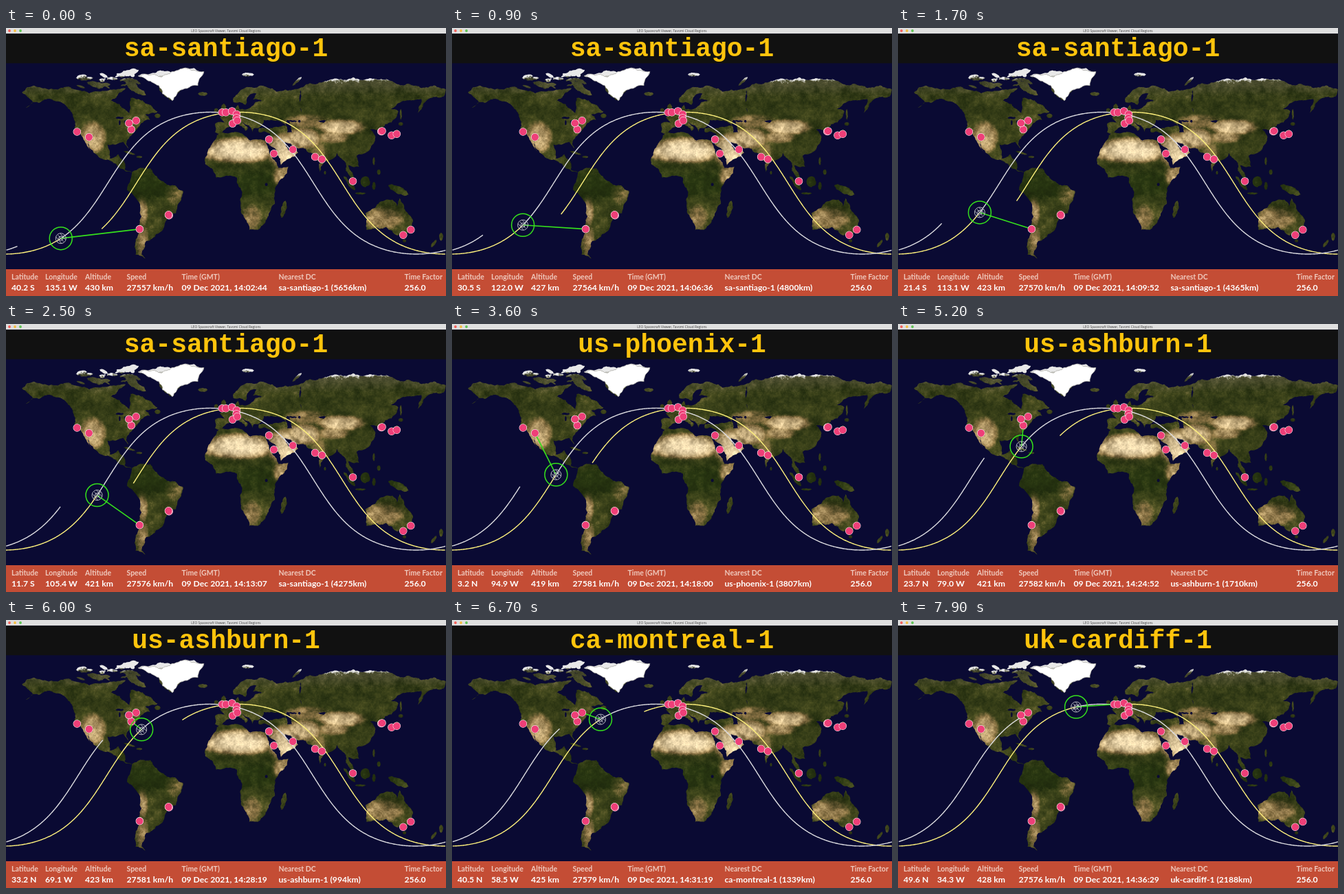
An HTML page with a canvas that plays this animation: 640x390 px, repeating every 8 s.

```html
<!DOCTYPE html>
<html lang="en">
<head>
<meta charset="utf-8">
<title>LEO Spacecraft Viewer</title>
<style>
html, body { margin: 0; width: 100%; height: 100%; overflow: hidden; background: #0a0a33; }
canvas, svg { position: absolute; left: 0; top: 0; }
svg { font-family: Lato, Carlito, sans-serif; font-weight: 700; }
#region { font: 700 38px "Liberation Mono", "Courier New", monospace; fill: #ffc40c; }
#window { font: 400 4.8px "Open Sans", sans-serif; fill: #444; }
.label { font-size: 10.5px; fill: #efc9bd; }
.value { font-size: 12.2px; fill: #fff; }
</style>
</head>
<body>
<canvas id="map" width="640" height="390"></canvas>
<svg id="ui" width="640" height="390">
  <rect width="640" height="8.3" fill="#dfdfdf"/>
  <circle cx="5" cy="4" r="1.9" fill="#f4605a"/>
  <circle cx="13" cy="4" r="1.9" fill="#f6be40"/>
  <circle cx="21" cy="4" r="1.9" fill="#5fc454"/>
  <text id="window" x="320" y="5.9" text-anchor="middle">LEO Spacecraft Viewer, Tavomi Cloud Regions</text>
  <rect y="8.3" width="640" height="43" fill="#111"/>
  <text id="region" x="320" y="40.6" text-anchor="middle"></text>
  <rect y="351" width="640" height="39" fill="#c44d35"/>
</svg>
<script>
const $ = id => document.getElementById(id);
const ctx = $('map').getContext('2d');
const X = lon => 320 + lon * 16 / 9, Y = lat => 225.7 - lat * 2;
const { sin, cos, asin, acos, atan2, round, floor, abs, exp, min, max, PI } = Math;
const RAD = PI / 180, OCEAN = '#0a0a33';
const mix = (a, b, f) => a + (b - a) * f;
const clamp = v => min(1, max(0, v));

let seed = 7;
const rnd = () => (seed = seed * 16807 % 2147483647) / 2147483647;

// Key points of the coasts, longitude and latitude; fractal edges fill in the rest
const CONTINENTS = {
  northAmerica: '-167 66 -157 71 -128 70 -95 68 -82 69 -94 60 -82 53 -79 51 -78 62 -66 58 -56 52 -66 50 -62 46 -70 43 -76 36 -81 31 -80 25 -84 30 -97 28 -95 18 -88 21 -83 15 -83 10 -77 8 -94 16 -105 20 -113 31 -110 23 -124 40 -125 48 -135 59 -150 60 -164 55 -158 59',
  southAmerica: '-77 8 -62 11 -50 0 -35 -6 -39 -15 -41 -22 -48 -26 -57 -37 -65 -42 -69 -52 -66 -55 -74 -52 -71 -30 -70 -18 -81 -5 -78 3',
  africa: '-6 36 10 37 20 31 33 31 38 18 43 11 51 12 40 -4 40 -15 35 -22 32 -29 26 -34 19 -34 12 -17 13 -8 9 0 9 4 -8 4 -17 14 -15 23',
  europe: '-9 37 -9 43 -1 44 -5 48 2 51 8 55 10 57 11 54 20 55 24 59 30 60 22 61 25 65 21 65 17 61 16 57 11 59 6 59 6 62 15 69 28 71 41 67 34 66 44 67 62 69 62 46 50 46 49 42 37 46 31 46 28 41 23 40 22 37 13 45 18 40 16 38 9 44 0 40 -5 36',
  northAsia: '60 69 72 72 104 77 140 72 180 68 178 63 163 59 157 51 160 61 143 59 135 54 141 52 132 43 100 41 60 43',
  southAsia: '132 45 127 39 128 35 122 39 118 39 122 31 116 23 107 20 109 12 100 13 104 2 98 9 97 16 91 22 80 15 77 8 72 21 57 26 48 30 51 24 57 25 59 22 45 13 35 28 36 36 27 37 27 40 41 41 49 42 50 37 54 37 52 45 62 46',
  australia: '114 -22 115 -34 131 -32 140 -38 148 -38 153 -28 145 -15 142 -11 140 -17 136 -12 131 -12 122 -18',
  greenland: '-72 78 -35 83.5 -18 81 -23 71 -40 65 -44 60 -52 65 -55 71 -66 76'
};

// lon, lat, radii, tilt
const ISLANDS = [
  [-2, 54, 2, 4], [-8, 53, 1.8, 1.6], [-19, 65, 4, 1.4], [47, -19, 2, 6.5, -15], [137, 36, 5, 1.2, 35], [143, 43, 2, 1.3],
  [143, 50, .8, 4], [121, 16, 1, 3], [125, 8, 1.5, 2], [114, 1, 4, 4], [101, 0, 7, 1.6, -48], [110, -7.4, 4.5, .7],
  [121, -2, 1.5, 3], [141, -5, 9, 2.8, -22], [146, -42, 1.5, 1.2], [176, -39, 1.6, 3], [170, -44, 1.2, 3.5, -40],
  [-79, 22, 5, .7, -15], [-71, 19, 2.5, .8], [-56, 49, 2.5, 1.6], [-74, 69, 10, 2.6, -30], [-80, 80, 9, 2.3, 15],
  [18, 79, 5, 1.4], [58, 74, 5, 1, 40], [81, 7.5, .9, 1.3]
];
const LAKES = [[-87, 47.5, 3.4, .9], [-87, 44, .8, 1.9], [-82, 44.5, 1.3, 1.3], [33, -1, 1.2, 1.2], [60, 45, 1, 1]];

// Arid regions: lon, lat, radii, strength
const DRY = [
  [10, 24, 30, 9, 1.1], [47, 24, 14, 12, 1], [63, 33, 15, 8, .85], [94, 41, 20, 6, .85], [66, 45, 20, 6, .55], [88, 34, 14, 5, .65],
  [-109, 34, 11, 12, .65], [-69, -42, 6, 13, .55], [-69, -21, 5, 11, .6], [20, -25, 9, 10, .55], [45, 6, 7, 9, .6],
  [129, -25, 18, 9, .6], [76, 21, 8, 10, .4], [-42, -9, 8, 8, .35]
];
const RAMP = [[40, 54, 17], [66, 70, 29], [136, 113, 68], [205, 180, 132], [238, 217, 174]];

// Splits an edge into a jagged coast
function rough(path, ax, ay, bx, by) {
  const dx = bx - ax, dy = by - ay;
  if (dx * dx + dy * dy < 9) return path.lineTo(bx, by);
  const k = (rnd() - .5) * .28, mx = (ax + bx) / 2 - dy * k, my = (ay + by) / 2 + dx * k;
  rough(path, ax, ay, mx, my);
  rough(path, mx, my, bx, by);
}

function shape(points) {
  const path = new Path2D(), p = points.map(([lon, lat]) => [X(lon), Y(lat)]);
  path.moveTo(...p[0]);
  p.forEach((a, i) => rough(path, ...a, ...p[(i + 1) % p.length]));
  return path;
}

function coast(text) {
  const n = text.split(' ').map(Number);
  return shape(n.filter((v, i) => i % 2 == 0).map((lon, i) => [lon, n[2 * i + 1]]));
}

function island([lon, lat, rx, ry, tilt = 0]) {
  const c = cos(tilt * RAD), s = sin(tilt * RAD);
  return shape([0, 1, 2, 3, 4, 5, 6, 7].map(i => {
    const u = rx * cos(i * PI / 4), v = ry * sin(i * PI / 4);
    return [lon + u * c - v * s, lat + u * s + v * c];
  }));
}

const hash = (x, y) => { const v = sin(x * 127.1 + y * 311.7) * 43758.5453; return v - floor(v); };
function noise(x, y) {
  const i = floor(x), j = floor(y), ease = f => f * f * (3 - 2 * f), u = ease(x - i), v = ease(y - j);
  return mix(mix(hash(i, j), hash(i + 1, j), u), mix(hash(i, j + 1), hash(i + 1, j + 1), u), v);
}
const relief = (x, y) => [24, 10, 4, 1.6].reduce((sum, size, i) => sum + noise(x / size + i * 50, y / size) * [.3, .3, .22, .18][i], 0);

// Ground colour from dryness, latitude and relief
function ground(x, y) {
  const lon = (x - 320) * 9 / 16, lat = (225.7 - y) / 2, n = relief(x, y) - .5;
  let dry = .2 + n * .5 - .25 * exp(-lat * lat / 90);
  for (const [dl, db, rx, ry, power] of DRY) {
    const r2 = ((lon - dl) / rx) ** 2 + ((lat - db) / ry) ** 2;
    dry = max(dry, power * exp(-r2 * r2 * .8) + n * .55);
  }
  const step = clamp(dry / 1.1) * 3.999, i = floor(step);
  const cold = .5 * clamp((lat - 63) / 10 + n), snow = clamp((lat - 75 + 12 * n) / 2);
  return RAMP[i].map((v, c) => {
    const land = mix(mix(v, RAMP[i + 1][c], step - i), [92, 88, 68][c], cold);
    return mix(land * (1 + n * .7), 232, snow);
  });
}

function paintWorld() {
  const layer = document.createElement('canvas'), g = layer.getContext('2d');
  layer.width = 640;
  layer.height = 390;
  Object.values(CONTINENTS).forEach(s => g.fill(coast(s)));
  ISLANDS.forEach(s => g.fill(island(s)));
  for (let i = 0; i < 26; i++) // Arctic archipelago
    g.fill(island([-122 + rnd() * 48, 70 + rnd() * 9, 2 + rnd() * 4, .5 + rnd() * 1.2, rnd() * 60 - 30]));
  g.globalCompositeOperation = 'destination-out';
  LAKES.forEach(s => g.fill(island(s)));
  const image = g.getImageData(0, 0, 640, 390), d = image.data;
  for (let i = 0; i < d.length; i += 4)
    if (d[i + 3]) ground(i / 4 % 640, floor(i / 2560)).forEach((v, c) => d[i + c] = v);
  g.putImageData(image, 0, 0);
  g.globalCompositeOperation = 'source-over';
  const ice = coast(CONTINENTS.greenland);
  g.fillStyle = '#fff';
  g.fill(ice);
  g.strokeStyle = '#a5a49c';
  g.lineWidth = .7;
  g.stroke(ice);
  return layer;
}

// Data centres: lat, lon, name where it can be nearest
const CENTRES = [[-33.45, -70.67, 'sa-santiago-1'], [33.45, -112.07, 'us-phoenix-1'], [39.04, -77.49, 'us-ashburn-1'],
  [45.5, -73.57, 'ca-montreal-1'], [51.48, -3.18, 'uk-cardiff-1'], [37.34, -121.89, 'us-sanjose-1'], [43.65, -79.38, 'ca-toronto-1'],
  [-23.5, -46.6, 'sa-saopaulo-1'], [-23, -47, 'sa-vinhedo-1'], [51.5, -.1], [52.4, 4.9], [50.1, 8.7], [47.4, 8.5], [43.3, 5.4],
  [45.5, 9.2], [31.8, 35.2], [21.5, 39.2], [24.5, 54.7], [19.1, 72.9], [17.4, 78.5], [1.4, 103.8], [37.6, 127], [37.9, 127.7],
  [34.7, 135.5], [35.7, 139.7], [-33.9, 151.2], [-37.8, 145]];

const gap = (lat, lon, c) => 6366 * acos(sin(lat * RAD) * sin(c[0] * RAD) +
  cos(lat * RAD) * cos(c[0] * RAD) * cos((lon - c[1]) * RAD));
const nearest = (lat, lon) => CENTRES.map(c => ({ c, km: gap(lat, lon, c) })).reduce((a, b) => b.km < a.km ? b : a);

// Circular orbit: u is the angle from the ascending node, in degrees
const TILT = 51.64 * RAD, SPAN = 349, DRIFT = .065;
const latAt = u => asin(sin(TILT) * sin(u * RAD)) / RAD;
const swing = u => atan2(cos(TILT) * sin(u * RAD), cos(u * RAD)) / RAD;

// Simulated seconds reached at loop times in ms; the pace wavers slightly
const PACE = [[0, 0], [900, 232], [2500, 623], [3600, 916], [5200, 1328], [7900, 2025]];
function elapsed(ms) {
  const i = max(1, PACE.findIndex(p => p[0] >= ms)), [a, s] = PACE[i - 1], [b, e] = PACE[i];
  return mix(s, e, (ms - a) / (b - a));
}

function track(u, node, span, color) {
  let last = -999;
  ctx.beginPath();
  for (let i = 0; i <= 700; i++) {
    const d = span * i / 700, x = (X(swing(u + d) + node - d * DRIFT) + 1280) % 640, y = Y(latAt(u + d));
    abs(x - last) > 320 ? ctx.moveTo(x, y) : ctx.lineTo(x, y);
    last = x;
  }
  ctx.strokeStyle = color;
  ctx.lineWidth = 1.4;
  ctx.stroke();
}

function ring(x, y, r, color, width) {
  ctx.beginPath();
  ctx.arc(x, y, r, 0, 7);
  ctx.strokeStyle = color;
  ctx.lineWidth = width;
  ctx.stroke();
}

function station(x, y) {
  ctx.save();
  ctx.translate(x, y);
  ctx.rotate(-.7);
  ring(0, 0, 7.5, '#b9bcc2', .9);
  ctx.beginPath();
  for (const k of [-4, 0, 4]) {
    ctx.moveTo(k, -6);
    ctx.lineTo(k, 6);
  }
  ctx.moveTo(-7, 0);
  ctx.lineTo(7, 0);
  ctx.stroke();
  ring(0, 0, 3, '#dcdde0', .8);
  ctx.restore();
}

function addText(x, y, kind, text) {
  const t = document.createElementNS('http://www.w3.org/2000/svg', 'text');
  t.setAttribute('x', x);
  t.setAttribute('y', y);
  t.setAttribute('class', kind);
  t.textContent = text;
  return $('ui').appendChild(t);
}
const fields = [[8, 'Latitude'], [57, 'Longitude'], [115, 'Altitude'], [175.5, 'Speed'], [255.5, 'Time (GMT)'], [396.5, 'Nearest DC'], [579.5, 'Time Factor']]
  .map(([x, name]) => (addText(x, 366, 'label', name), addText(x, 382, 'value', '')));

const world = paintWorld();
const START = Date.UTC(2021, 11, 9, 14, 2, 44);

function draw(ms) {
  const s = elapsed(ms), u = -55.45 + .06498 * s, node = -93.11 - .00467 * s, h = sin(u * RAD);
  const lat = latAt(u), lon = swing(u) + node, x = X(lon), y = Y(lat), { c, km } = nearest(lat, lon);
  ctx.fillStyle = OCEAN;
  ctx.fillRect(0, 0, 640, 390);
  ctx.drawImage(world, 0, 0);
  track(u, node, -SPAN, '#fdf07c');
  track(u, node, SPAN, '#dcdce0');
  ctx.beginPath();
  ctx.moveTo(x, y);
  ctx.lineTo(X(c[1]), Y(c[0]));
  ctx.strokeStyle = '#35e01c';
  ctx.lineWidth = 1.6;
  ctx.stroke();
  for (const [la, lo] of CENTRES) {
    ctx.fillStyle = '#ee3f78';
    ring(X(lo), Y(la), 5.2, '#fff', 1.1);
    ctx.fill();
  }
  station(x, y);
  ring(x, y, 16.5, '#35e01c', 1.5);

  const altitude = 419.05 + 12.8 * h * h - 3.3 * h, speed = 27580.5 - 18.8 * h * h + 13.2 * h;
  const values = [
    abs(lat).toFixed(1) + (lat < 0 ? ' S' : ' N'), abs(lon).toFixed(1) + ' W', round(altitude) + ' km', round(speed) + ' km/h',
    '09 Dec 2021, ' + new Date(START + round(s) * 1000).toISOString().slice(11, 19), `${c[2]} (${round(km)}km)`, '256.0'
  ];
  fields.forEach((f, i) => f.textContent = values[i]);
  $('region').textContent = c[2];
}

function tick() {
  draw(floor(performance.now() % 8000 / 100) * 100);
  requestAnimationFrame(tick);
}
tick();
</script>
</body>
</html>
```
